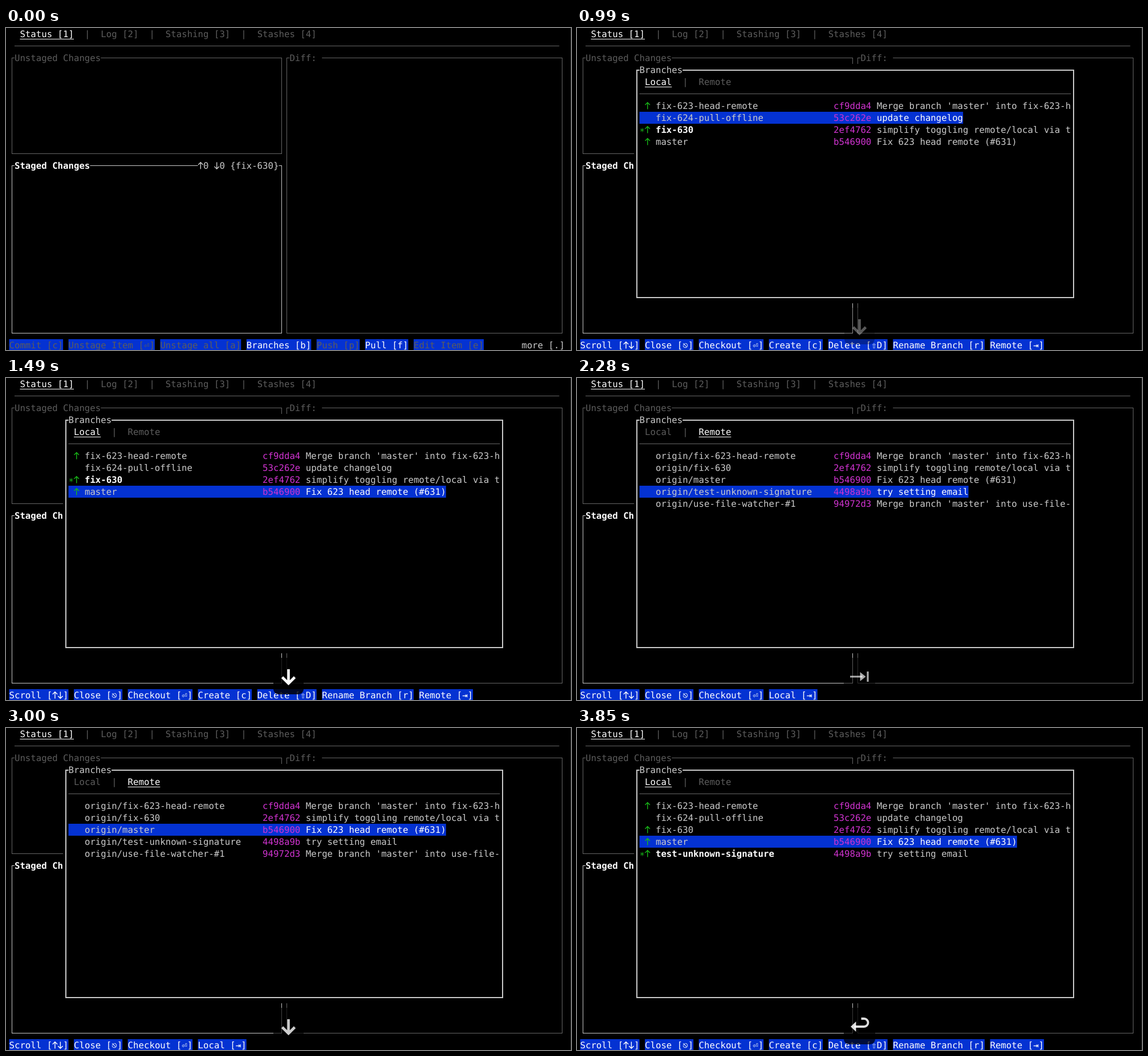
An HTML page with a canvas for the animation above (3950 ms loop, 991 by 565 pixels).

```html
<!DOCTYPE html>
<html lang="en">
<head>
<meta charset="utf-8">
<title>Branch list</title>
<style>
  html, body { margin: 0; width: 100%; height: 100%; overflow: hidden; background: #000; }
  canvas { display: block; width: 991px; height: 565px; }
</style>
</head>
<body>
<canvas id="stage" width="991" height="565"></canvas>
<script>
const ctx = document.getElementById('stage').getContext('2d');
const LOOP = 3950;
const CW = 9.46, CH = 21, X0 = 5.5;
const FONT = '15.71px "DejaVu Sans Mono", monospace';
const BLUE = '#0432d2', DIM = '#5c5c5c', LINE = '#666', GREY = '#cacaca',
      WHITE = '#fff', PINK = '#d033d0', GREEN = '#18b818';

const left = col => X0 + col * CW;
const mid = row => 10.5 + row * CH;

function arrow(x, y, dir) {
  ctx.lineWidth = 1.4;
  ctx.beginPath();
  ctx.moveTo(x, y - 6 * dir);
  ctx.lineTo(x, y + 5.5 * dir);
  ctx.moveTo(x - 4.2, y + 1.5 * dir);
  ctx.lineTo(x, y + 5.7 * dir);
  ctx.lineTo(x + 4.2, y + 1.5 * dir);
  ctx.stroke();
}

// Terminal text: every non-ASCII symbol takes exactly one cell.
function print(text, col, row, color, bold) {
  ctx.font = (bold ? 'bold ' : '') + FONT;
  ctx.textAlign = 'left';
  ctx.fillStyle = ctx.strokeStyle = color;
  for (const part of text.split(/([^\x00-\x7f])/)) {
    if (part === '↑' || part === '↓') {
      arrow(left(col + 0.5), mid(row), part === '↓' ? 1 : -1);
    } else if (part) {
      ctx.fillText(part, left(col), mid(row) + 5.5);
    }
    col += part.length;
  }
}

function fillCells(col, row, count, color) {
  ctx.fillStyle = color;
  ctx.fillRect(left(col), row * CH, count * CW, CH);
}

// Lines sit on whole pixels.
function hline(x1, x2, row, color, width = 1) {
  ctx.fillStyle = color;
  ctx.fillRect(x1, Math.round(mid(row) - width / 2), x2 - x1, width);
}

function vline(x, r1, r2, color, width = 1) {
  const top = Math.round(mid(r1) - width / 2);
  ctx.fillStyle = color;
  ctx.fillRect(Math.round(x - width / 2), top, width, (r2 - r1) * CH + width);
}

function panel(c1, r1, c2, r2, title, color, titleColor, { bold, width = 1, right = '' } = {}) {
  const x1 = left(c1 + 0.5), x2 = left(c2 + 0.5);
  const titleEnd = left(c1 + 1 + title.length);
  hline(x1, left(c1 + 1), r1, color, width);
  if (right) {
    hline(titleEnd, left(c2 - right.length), r1, color, width);
    hline(left(c2), x2, r1, color, width);
  } else {
    hline(titleEnd, x2, r1, color, width);
  }
  hline(x1, x2, r2, color, width);
  vline(x1, r1, r2, color, width);
  vline(x2, r1, r2, color, width);
  print(title, c1 + 1, r1, titleColor, bold);
  print(right, c2 - right.length, r1, GREY);
}

function tabs(names, active, col, row) {
  names.forEach((name, i) => {
    if (i) {
      print('|', col + 2, row, DIM);
      col += 5;
    }
    print(name, col, row, i === active ? WHITE : DIM);
    if (i === active) {
      ctx.fillStyle = WHITE;
      ctx.fillRect(left(col), mid(row) + 8.5, name.length * CW, 1);
    }
    col += name.length;
  });
}

// A leading "-" marks a disabled command.
function commands(list) {
  let col = 0;
  for (const item of list) {
    const off = item[0] === '-';
    const label = off ? item.slice(1) : item;
    fillCells(col, 26, label.length, BLUE);
    print(label, col, 26, off ? DIM : WHITE);
    col += label.length + 1;
  }
}

const MERGE = "Merge branch 'master' into ";
const COMMITS = {
  cf9dda4: MERGE + 'fix-623-h',
  '53c262e': 'update changelog',
  '2ef4762': 'simplify toggling remote/local via t',
  b546900: 'Fix 623 head remote (#631)',
  '4498a9b': 'try setting email',
  '94972d3': MERGE + 'use-file-'
};

const LOCAL_KEYS = ['Scroll [↑↓]', 'Close [⎋]', 'Checkout [⏎]', 'Create [c]',
  'Delete [⇧D]', 'Rename Branch [r]', 'Remote [⇥]'];
const REMOTE_KEYS = [...LOCAL_KEYS.slice(0, 3), 'Local [⇥]'];
const STATUS_KEYS = ['-Commit [c]', '-Unstage Item [⏎]', '-Unstage all [a]',
  'Branches [b]', '-Push [p]', 'Pull [f]', '-Edit Item [e]'];

// Each branch: mark, name, commit.
const COMMON = [
  [' ↑', 'fix-623-head-remote', 'cf9dda4'],
  ['', 'fix-624-pull-offline', '53c262e']
];
const VIEWS = {
  local: { tab: 0, keys: LOCAL_KEYS, rows: [
    ...COMMON, ['∗↑', 'fix-630', '2ef4762'], [' ↑', 'master', 'b546900']] },
  remote: { tab: 1, keys: REMOTE_KEYS, rows: [
    ['', 'origin/fix-623-head-remote', 'cf9dda4'],
    ['', 'origin/fix-630', '2ef4762'],
    ['', 'origin/master', 'b546900'],
    ['', 'origin/test-unknown-signature', '4498a9b'],
    ['', 'origin/use-file-watcher-#1', '94972d3']] },
  switched: { tab: 0, keys: LOCAL_KEYS, rows: [
    ...COMMON, [' ↑', 'fix-630', '2ef4762'], [' ↑', 'master', 'b546900'],
    ['∗↑', 'test-unknown-signature', '4498a9b']] }
};

// Time, view, selected row, pressed keys, key overlay opacity.
const STEPS = [
  [0, '', 0, '', 0],
  [70, 'local', 0, 'b', .35], [140, 'local', 0, 'b', .8], [210, 'local', 0, 'b', 1],
  [570, 'local', 0, 'b', .87], [640, 'local', 0, 'b', .4], [710, 'local', 0, '', 0],
  [990, 'local', 1, '↓', .35], [1070, 'local', 2, '↓↓', .8], [1140, 'local', 2, '↓↓', 1],
  [1350, 'local', 3, '↓', .35], [1420, 'local', 3, '↓', .8], [1490, 'local', 3, '↓', 1],
  [1780, 'remote', 3, '⇥', .5], [1850, 'remote', 3, '⇥', 1],
  [2280, 'remote', 3, '⇥', .67], [2350, 'remote', 3, '', 0],
  [2500, 'remote', 2, '↑', .35], [2570, 'remote', 1, '↑↑', .8], [2640, 'remote', 1, '↑↑', 1],
  [2920, 'remote', 2, '↓', .35], [2990, 'remote', 2, '↓', .8],
  [3060, 'remote', 3, '↓↓', .9], [3140, 'remote', 3, '↓↓', 1],
  [3350, 'remote', 3, '⏎', .35], [3420, 'remote', 3, '⏎', .8],
  [3500, 'switched', 3, '⏎', 1], [3850, 'switched', 3, '⏎', .87]
];

function status() {
  tabs(['Status [1]', 'Log [2]', 'Stashing [3]', 'Stashes [4]'], 0, 2, 0);
  hline(left(1), left(102), 1, LINE);
  panel(0, 2, 50, 10, 'Unstaged Changes', LINE, DIM);
  panel(0, 11, 50, 25, 'Staged Changes', GREY, WHITE, { bold: true, right: '↑0 ↓0 {fix-630}' });
  panel(51, 2, 102, 25, 'Diff: ', LINE, DIM);
  ctx.fillStyle = '#2a2a2a';
  ctx.fillRect(990, 0, 1, 565);
}

function popup(view, selected) {
  ctx.fillStyle = '#000';
  ctx.fillRect(left(10), 3 * CH, 82 * CW, 20 * CH);
  panel(10, 3, 91, 22, 'Branches', GREY, GREY, { width: 2 });
  tabs(['Local', 'Remote'], view.tab, 12, 4);
  hline(left(11), left(91), 5, LINE);
  view.rows.forEach(([mark, name, hash], i) => {
    const row = 6 + i, on = i === selected, head = mark[0] === '∗';
    const message = COMMITS[hash];
    if (on) fillCells(11, row, 44 + message.length, BLUE);
    print(mark, 11, row, GREEN);
    print(name, 14, row, head ? WHITE : GREY, head);
    print(hash, 47, row, PINK);
    print(message, 55, row, on ? WHITE : GREY);
  });
}

function strokePath(d, width) {
  ctx.lineWidth = width;
  ctx.stroke(new Path2D(d));
}

// Key symbols, drawn around their own centre.
const SYMBOLS = {
  b() {
    ctx.font = '500 33px Inter, sans-serif';
    ctx.textAlign = 'center';
    ctx.fillText('b', 0, 12);
  },
  '↓'() {
    strokePath('M0-12.5V13M-11 1.5L0 12.5L11 1.5', 4.6);
  },
  '↑'() {
    strokePath('M0 14.5V-11M-11 .5L0-10.5L11 .5', 4.6);
  },
  '⇥'() {
    strokePath('M-16.5 .5H5M14.5-8.5V9.5', 3.2);
    ctx.fill(new Path2D('M1-7.5L11 .5L1 8.5Z'));
  },
  '⏎'() {
    strokePath('M3-13.5H8A7 7 0 0 1 8 .5H-9', 3.8);
    ctx.fill(new Path2D('M-15.5 .5L-6-8.5V9.5Z'));
  }
};
const KEY_WIDTH = { b: 19, '⇥': 33, '⏎': 33 };

function overlay(keys, level) {
  const pitch = KEY_WIDTH[keys[0]] || 31;
  const width = pitch * keys.length + 22;
  ctx.save();
  ctx.translate(495.5, 523.5);
  ctx.fillStyle = `rgba(0,0,0,${0.82 * level})`;
  ctx.beginPath();
  ctx.roundRect(-width / 2, -32.5, width, 64, 9);
  ctx.fill();
  ctx.globalAlpha = level;
  ctx.fillStyle = ctx.strokeStyle = WHITE;
  ctx.translate(-pitch * (keys.length - 1) / 2, 0);
  for (const key of keys) {
    SYMBOLS[key]();
    ctx.translate(pitch, 0);
  }
  ctx.restore();
}

function draw(time) {
  const [, name, selected, keys, level] = STEPS.findLast(step => step[0] <= time);
  ctx.textRendering = 'geometricPrecision';
  ctx.fillStyle = '#000';
  ctx.fillRect(0, 0, 991, 565);
  status();
  if (name) {
    popup(VIEWS[name], selected);
    commands(VIEWS[name].keys);
  } else {
    commands(STATUS_KEYS);
    print('more [.]', 95, 26, GREY);
  }
  if (keys) overlay(keys, level);
}

const start = performance.now();
function tick() {
  draw((performance.now() - start) % LOOP);
  requestAnimationFrame(tick);
}
tick();
</script>
</body>
</html>
```
